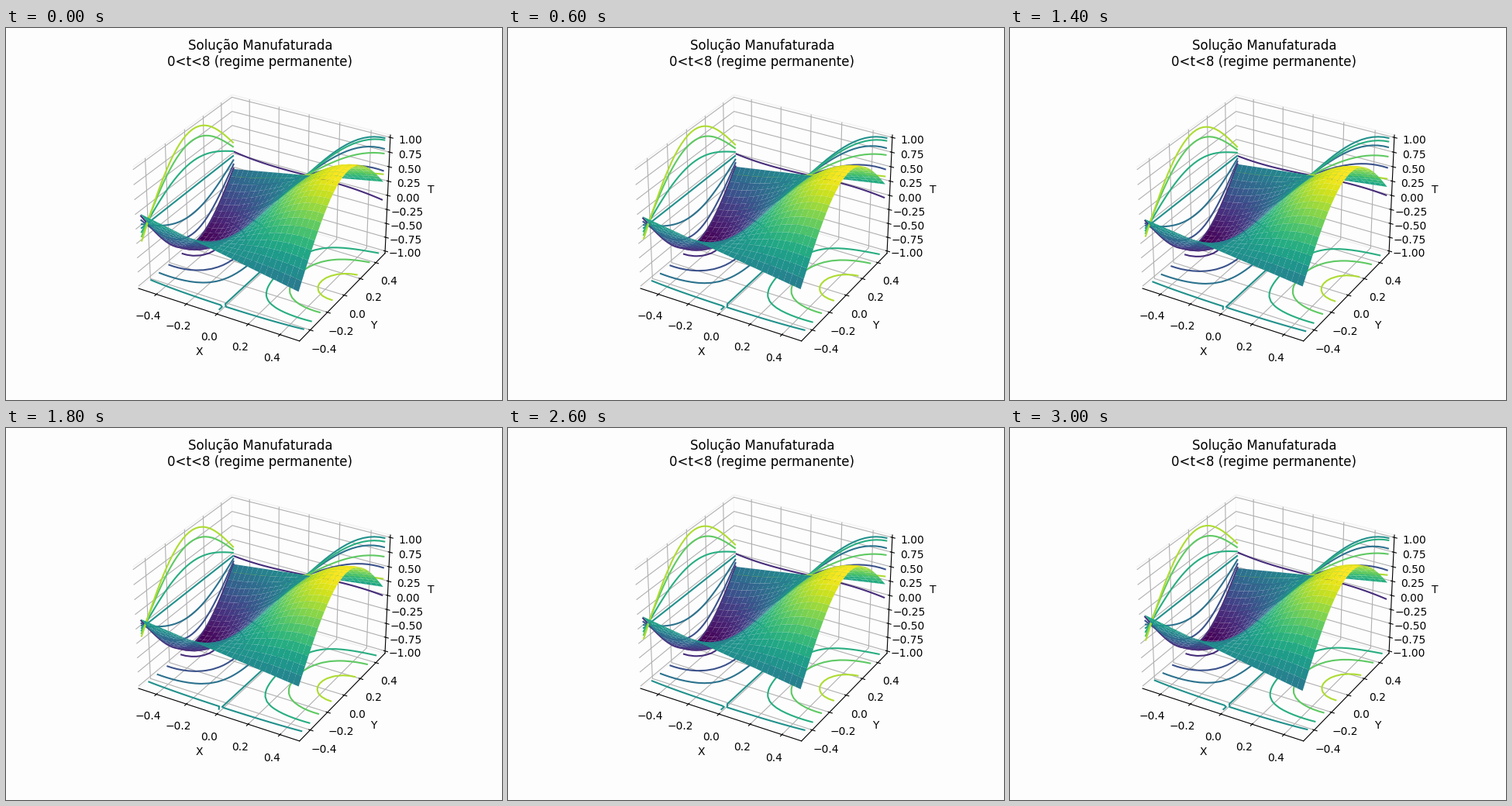
A matplotlib script for the animation above (3.2 s loop, 640x480 px).

```python
import numpy as np
import matplotlib.pyplot as plt
from matplotlib.animation import FuncAnimation

FRAMES = 16
INTERVAL = 200
TURN = FRAMES // 2      # time runs 0..8, then back
BACKGROUND = "#fdfdfd"
MARGIN = 25 / 24        # axes box is slightly larger than the domain

side = np.linspace(-0.5, 0.5, 30)
X, Y = np.meshgrid(side, side)


def temperature(t):
    """Fixed wave plus a slowly decaying twist."""
    steady = np.sin(np.pi * X) * np.cos(np.pi * Y)
    twist = X * Y * np.exp(-t / 16)
    # the tiny shift keeps the zero contour's saddle from flipping
    return steady + twist - 1e-9


fig = plt.figure(figsize=(6.4, 4.8), dpi=100, facecolor=BACKGROUND)
ax = fig.add_subplot(projection="3d", facecolor=BACKGROUND)
ax.set_title("Solução Manufaturada\n0<t<8 (regime permanente)")
ax.set_xlabel("X")
ax.set_ylabel("Y")
ax.set_zlabel("T")
for axis in (ax.xaxis, ax.yaxis, ax.zaxis):
    axis.set_pane_color(BACKGROUND)
    axis.pane.set_edgecolor("#f2f2f2")


def set_limits():
    ax.set_xlim(-0.5 * MARGIN, 0.5 * MARGIN)
    ax.set_ylim(-0.5 * MARGIN, 0.5 * MARGIN)
    ax.set_zlim(-MARGIN, MARGIN)


def update(frame):
    for artist in list(ax.collections):
        artist.remove()
    T = temperature(TURN - abs(TURN - frame))
    ax.plot_surface(X, Y, T, cmap="viridis")
    for zdir, offset in (("z", -1), ("x", -0.5), ("y", 0.5)):
        ax.contour(X, Y, T, zdir=zdir, offset=offset, cmap="viridis")
    set_limits()
    return []


set_limits()
anim = FuncAnimation(fig, update, frames=FRAMES, interval=INTERVAL,
                     repeat=True, repeat_delay=0, blit=False)
plt.show()
```
